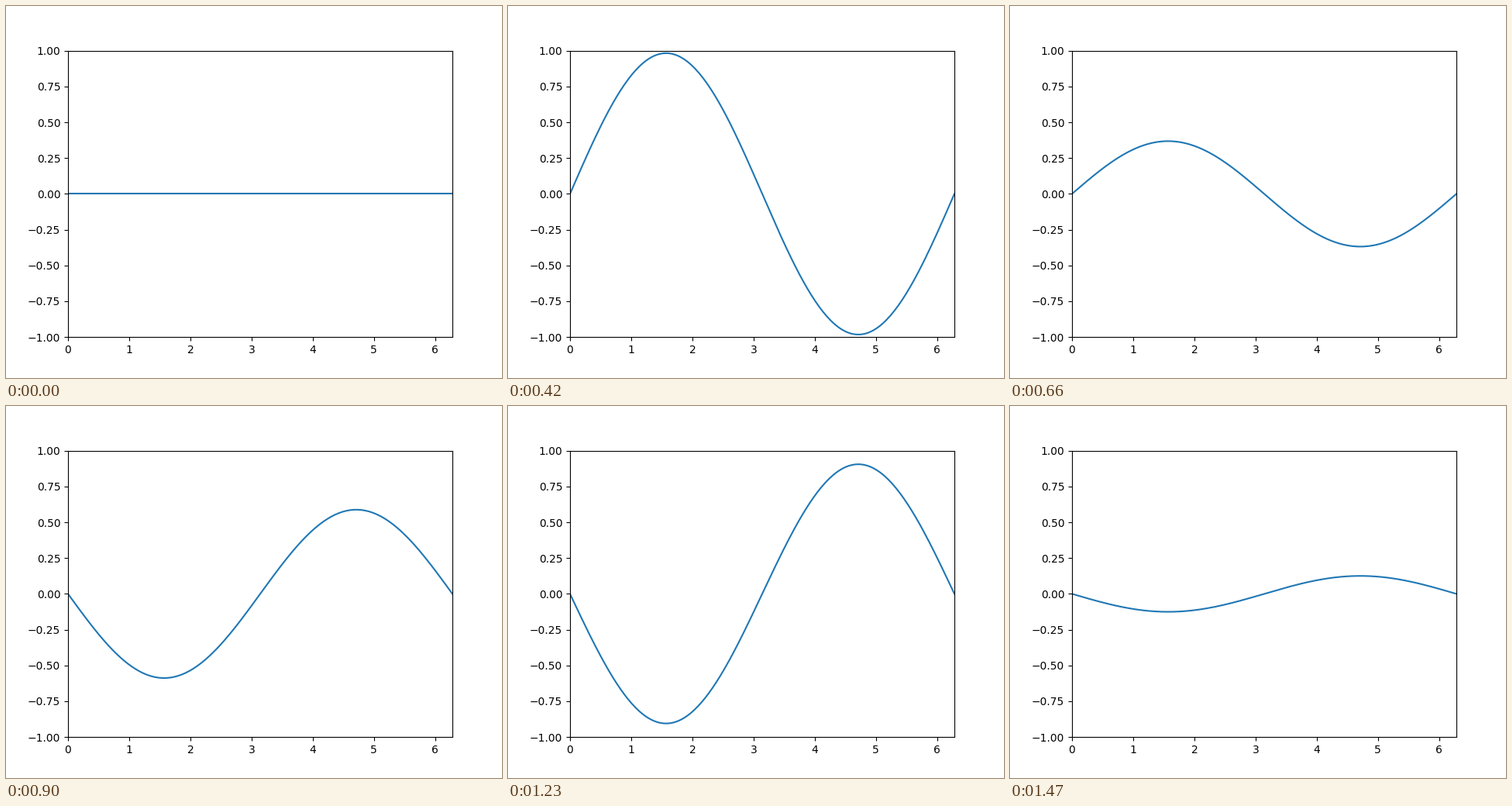
Animation, 640 px wide and 480 px high, one loop 1500 ms. Source, as a matplotlib script:

```python
import numpy as np
import matplotlib.pyplot as plt
from matplotlib.animation import FuncAnimation

FRAMES = 50
INTERVAL = 30  # ms

plt.rcParams["font.family"] = "DejaVu Sans"
fig, ax = plt.subplots(figsize=(6.4, 4.8), dpi=100)
ax.set_xlim(0, 2 * np.pi)
ax.set_ylim(-1, 1)

x = np.linspace(0, 2 * np.pi, 200)
line, = ax.plot(x, np.zeros_like(x), color="#1f77b4", lw=1.5)


def update(frame):
    """Standing wave: the amplitude swings through one full sine period."""
    amplitude = np.sin(2 * np.pi * frame / FRAMES)
    line.set_ydata(amplitude * np.sin(x))
    return line,


anim = FuncAnimation(fig, update, frames=FRAMES, interval=INTERVAL, repeat=True)
plt.show()
```
